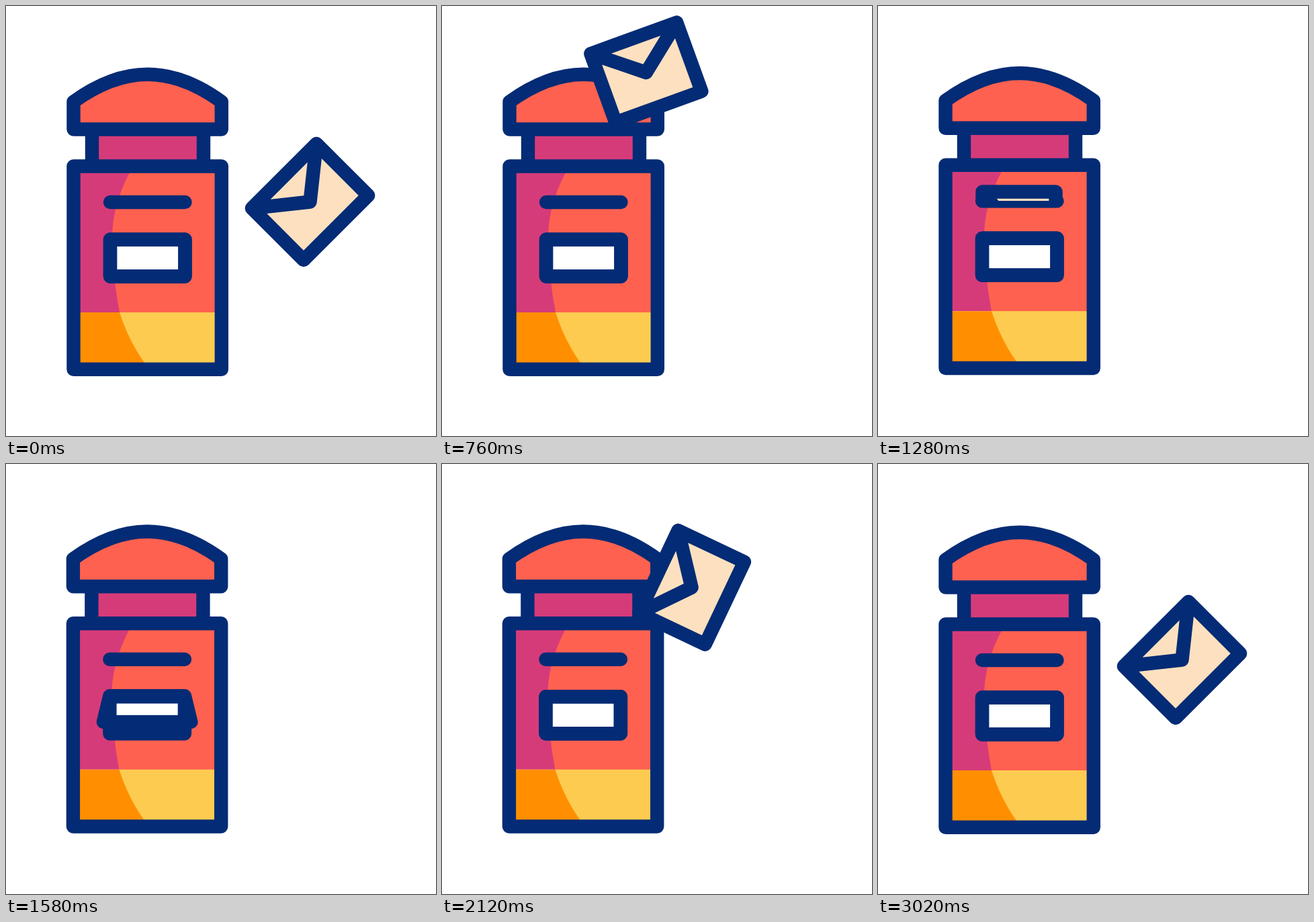
Write an HTML page that moves like this. It is 640 px wide and 640 px high and loops after 3600 ms.

```html
<!DOCTYPE html>
<html>
<head>
<meta charset="utf-8">
<style>
html, body { margin: 0; width: 100%; height: 100%; overflow: hidden; background: #fff; }
svg { display: block; width: 100vw; height: 100vh; }
.line { stroke: #042b75; stroke-width: 20.4; stroke-linecap: round; stroke-linejoin: round; }
</style>
</head>
<body>
<svg viewBox="0 0 640 640">
  <clipPath id="window"><rect id="opening" width="640" height="640"/></clipPath>
  <g id="box">
    <path fill="#d63b79" d="M101 238H321V456H101ZM128 183H294V238H128Z"/>
    <path fill="#ff8f00" d="M101 456H321V541H101Z"/>
    <path fill="#ff6150" d="M184 248Q158 297 158 345Q159 405 169 456H321V248Z"/>
    <path fill="#fdcb50" d="M169 456Q182 497 206 531H321V456Z"/>
    <path class="line" fill="none" d="M128 183V238M294 183V238M100.500 238.500H320.800V540.700H100.500ZM155 292H266.500"/>
    <path class="line" fill="#ff6150" d="M100.500 183.500V142.500Q157 101.700 210.700 101.700T320.800 142.500V183.500Z"/>
    <path class="line" fill="#fff" d="M155 347.500H266.500V402.500H155Z"/>
    <path class="line" fill="none" id="door"/>
  </g>
  <g clip-path="url(#window)">
    <path class="line" id="letter" fill="#fde0bf" d="M-68 -54.500H68V54.500H-68ZM68 -54.500L0 0L-68 -54.500"/>
  </g>
</svg>
<script>
const LOOP = 3600, SWAP = 1500;
const $ = id => document.getElementById(id);

// Cosine ease from 0 to 1 between two times
const easeAt = t => (from, to) => {
  const u = Math.min(1, Math.max(0, (t - from) / (to - from)));
  return (1 - Math.cos(Math.PI * u)) / 2;
};

// Dip, swoop over the box and sink into the slot
const post = ease => ({
  x: 452.5 + 8.5 * ease(0, 360) - 251 * ease(360, 1050),
  y: 291.5 + 48.5 * ease(0, 360) - 241 * ease(360, 700) + 380 * ease(960, SWAP),
  turn: -45 + 64.6 * ease(0, 360) - 109.6 * ease(560, 1050)
});

// Drop out of the door, swing up and settle beside the box
const emerge = ease => ({
  x: 210 + 242.5 * ease(1673, 2410),
  y: 318 + 189 * ease(1560, 1880) - 325 * ease(1880, 2100)
    + 141.5 * ease(2100, 2400) - 32 * ease(2400, 2720),
  turn: -90 + 31.6 * ease(1680, 1880) - 14.1 * ease(1880, 2400) + 27.5 * ease(2400, 2720)
});

function draw(t) {
  const ease = easeAt(t);
  const { x, y, turn } = (t < SWAP ? post : emerge)(ease);
  $('letter').setAttribute('transform', `translate(${x} ${y}) rotate(${turn})`);

  // Hide the part of the letter that is inside the box
  const sinking = t > 1000 && t < SWAP, dropping = t >= SWAP && t < 1880;
  $('opening').setAttribute('y', dropping ? 400 : 0);
  $('opening').setAttribute('height', sinking ? 290 : 640);

  const angle = (ease(1480, 1620) - ease(1820, 2020)) * Math.PI * 0.317;
  const wide = 13 * Math.sin(angle), low = 347.5 + 55 * Math.cos(angle);
  const top = 347.5 - 1.5 * Math.sin(angle);
  $('door').setAttribute('d', `M155 ${top}H266.5L${266.5 + wide} ${low}H${155 - wide}Z`);

  const shift = t < 1000 || t > 2200 ? '0 0' : sinking ? '0 -1.7' : '-.6 -1.2';
  $('box').setAttribute('transform', `translate(${shift})`);
}

const start = performance.now();
function tick() {
  draw((performance.now() - start) % LOOP);
  requestAnimationFrame(tick);
}
tick();
</script>
</body>
</html>
```
